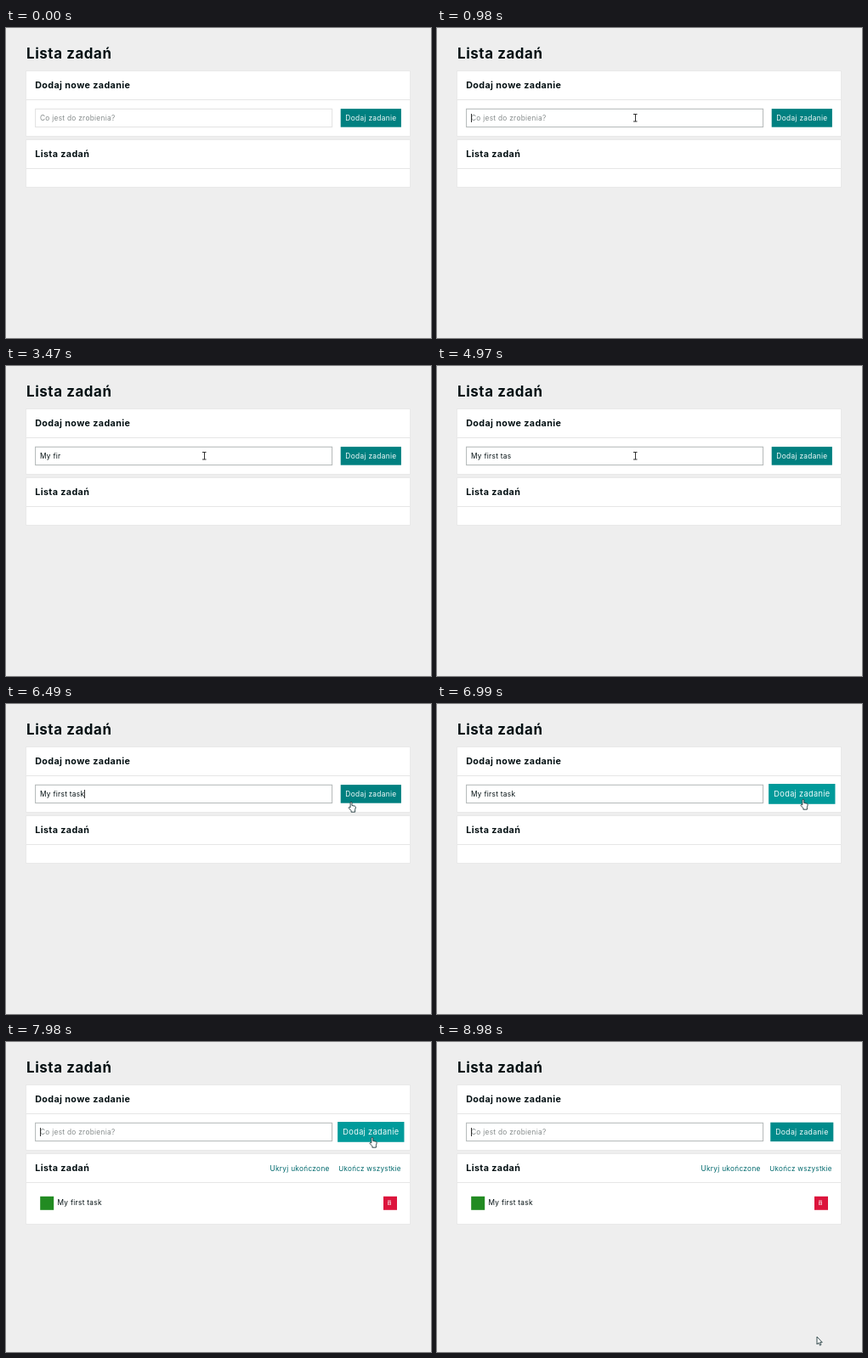
An HTML page with a canvas that plays this animation: 500x365 px, repeating every 9.48 s.

```html
<!DOCTYPE html>
<html lang="pl">
<head>
<meta charset="utf-8">
<title>Lista zadań</title>
<style>
html, body { margin: 0; width: 100%; height: 100%; overflow: hidden; background: #eee; }
canvas { display: block; width: 500px; height: 365px; }
</style>
</head>
<body>
<canvas id="stage"></canvas>
<script>
const W = 500, H = 365, LOOP = 9480;
const FONT = 'Inter, "Open Sans", sans-serif';
const INK = '#041013', LINK = '#00696d';
const BODY = 8.3;
const canvas = document.getElementById('stage');
const ctx = canvas.getContext('2d');
const dpr = window.devicePixelRatio || 1;
canvas.width = W * dpr;
canvas.height = H * dpr;

// Each step changes only the listed properties.
const steps = [
  [0, { typed: '', caret: false, focus: false, added: false, cursor: null, scale: 1, glow: 128 }],
  [500, { cursor: ['beam', 234, 97] }],
  [980, { cursor: ['beam', 233, 101], focus: true, caret: true }],
  [1470, { caret: false }],
  [1970, { typed: 'M', caret: true }],
  [2470, { typed: 'My ' }],
  [2970, { typed: 'My f', caret: false }],
  [3470, { typed: 'My fir' }],
  [3970, { typed: 'My first' }],
  [4470, { typed: 'My first tas', caret: true }],
  [4970, { caret: false }],
  [5470, { typed: 'My first task', caret: true }],
  [5980, { caret: false, cursor: ['arrow', 229, 83] }],
  [6490, { caret: true, cursor: ['hand', 402.7, 114.7] }],
  [6990, { caret: false, cursor: ['hand', 427.5, 111.7], scale: 1.1, glow: 154 }],
  [7490, { focus: false, glow: 160 }],
  [7980, { typed: '', added: true, focus: true, caret: true, glow: 155 }],
  [8480, { caret: false, glow: 154 }],
  [8980, { caret: true, cursor: ['arrow', 447, 347], scale: 1.04, glow: 139 }]
];

function stateAt(t) {
  const state = {};
  for (const [start, change] of steps) if (t >= start) Object.assign(state, change);
  return state;
}

function rect(x, y, w, h, color) {
  ctx.fillStyle = color;
  ctx.fillRect(x, y, w, h);
}

function setFont(size, weight = 400) {
  ctx.font = `${weight} ${size}px ${FONT}`;
  ctx.letterSpacing = `${size * 0.035}px`;
}

function text(str, x, y, size, color = INK, weight = 400, align = 'left') {
  setFont(size, weight);
  ctx.textAlign = align;
  ctx.fillStyle = color;
  ctx.fillText(str, x, y);
}

function panel(y, h, title) {
  rect(23, y - 1, 453, h + 2, '#e9e9e9');
  rect(24, y, 451, h, '#fff');
  rect(24, y + 33, 451, 1, '#e6e6e6');
  text(title, 34.2, y + 20, 10.75, INK, 700);
}

function input(s) {
  ctx.strokeStyle = s.focus ? '#b2b7b7' : '#e2e2e2';
  ctx.lineWidth = 1;
  ctx.strokeRect(34.6, 95.3, 349, 21.3);
  if (s.typed) text(s.typed, 40, 109, BODY);
  else text('Co jest do zrobienia?', 40, 109, BODY, '#858b8b');
  if (s.caret) {
    setFont(BODY);
    rect(40 + Math.floor(ctx.measureText(s.typed).width), 101, 1, 10, '#333');
  }
}

function button(s) {
  ctx.save();
  ctx.translate(429.3, 105.9);
  ctx.scale(s.scale, s.scale);
  rect(-35.6, -10.8, 71.2, 21.6, `rgb(0,${s.glow},${s.glow})`);
  text('Dodaj zadanie', 0.1, 3.1, 8.4, '#f4fbfb', 400, 'center');
  ctx.restore();
}

function task() {
  text('Ukryj ukończone', 380.7, 152, BODY, LINK, 400, 'right');
  text('Ukończ wszystkie', 464.8, 152, 8.1, LINK, 400, 'right');
  rect(40.2, 181.8, 16, 16, '#228b22');
  text('My first task', 60.5, 192, BODY);
  rect(444, 181.8, 16, 16, '#dc143c');
  rect(449, 186.5, 4, 1, '#f6c3cd');
  rect(449, 188, 4, 4, '#f0a5b3');
  rect(450.5, 188.5, 1, 3, '#dc143c');
}

const cursors = {
  beam() {
    rect(-2, 0, 4.5, 1, '#333');
    rect(0, 0, 1, 9, '#333');
    rect(-2, 8.5, 4.5, 1, '#333');
  },
  arrow() {
    outline('M0 0V9L2 7.2 3.5 10.2 4.9 9.5 3.5 6.7H6.2Z');
  },
  hand() {
    outline('M2.4 7.2V1.2Q3.4 -.3 4.3 1.2V4.8L7.8 5.5Q8.8 5.9 8.7 7.2L7.9 10V12.5H3.4V11L.4 7.6Q.6 6 2.4 7.2Z');
  }
};

function outline(d) {
  const path = new Path2D(d);
  ctx.fillStyle = '#fff';
  ctx.strokeStyle = '#20383b';
  ctx.lineWidth = 0.9;
  ctx.lineJoin = 'round';
  ctx.fill(path);
  ctx.stroke(path);
}

function pointer([kind, x, y]) {
  ctx.save();
  ctx.translate(x, y);
  cursors[kind]();
  ctx.restore();
}

function draw(t) {
  const s = stateAt(t);
  ctx.setTransform(dpr, 0, 0, dpr, 0, 0);
  rect(0, 0, W, H, '#eee');
  text('Lista zadań', 24, 36, 16.9, INK, 700);
  panel(51, 76, 'Dodaj nowe zadanie');
  panel(132, s.added ? 82 : 55, 'Lista zadań');
  input(s);
  button(s);
  if (s.added) task();
  if (s.cursor) pointer(s.cursor);
}

const begin = performance.now();
function tick() {
  draw((performance.now() - begin) % LOOP);
  requestAnimationFrame(tick);
}
tick();
</script>
</body>
</html>
```
